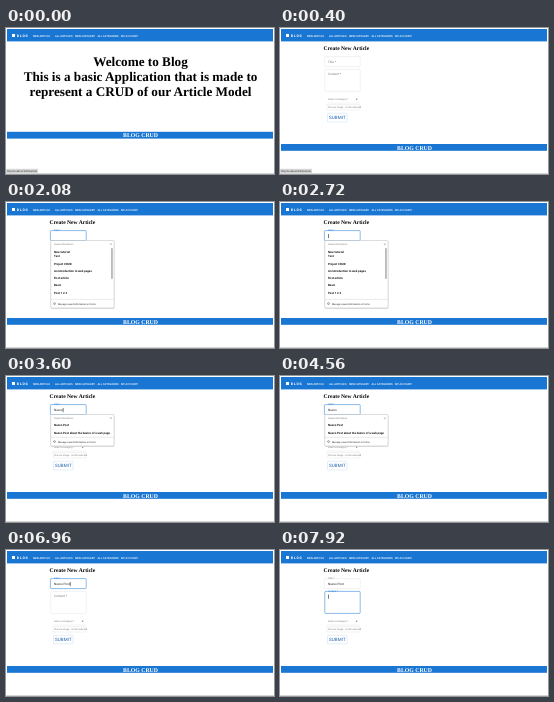
These frames come from a looping animation (268 by 146 pixels, 8 s). An HTML page:

```html
<!DOCTYPE html>
<html lang="en">
<head>
<meta charset="utf-8">
<title>Blog</title>
<style>
html, body { margin: 0; width: 100%; height: 100%; overflow: hidden; background: #fff; }
svg { display: block; width: 268px; height: 146px; }
text { font: 3.1px Roboto, "Liberation Sans", sans-serif; fill: #222; text-rendering: geometricPrecision; white-space: pre; }
.serif { font-family: "Liberation Serif", serif; font-weight: 700; fill: #000; }
.hero { font-size: 13.2px; text-anchor: middle; }
.head { font-size: 5.6px; }
.foot { font-size: 5.8px; text-anchor: middle; fill: #fff; }
.logo { font: 700 3.7px "Liberation Mono", monospace; letter-spacing: .7px; fill: #fff; }
.nav { font-size: 2.7px; font-weight: 500; fill: #fff; }
.label { fill: #777; }
.on { fill: #1976d2; }
.small { font-size: 2.4px; }
.item { font-size: 2.9px; font-weight: 700; fill: #111; }
.button { font-size: 4.5px; letter-spacing: .15px; fill: #1b5fae; }
.frame { fill: none; stroke: #c8c8c8; stroke-width: .25; }
.focus { stroke: #1976d2; stroke-width: .5; }
.blue { fill: #1976d2; }
</style>
</head>
<body>
<svg viewBox="0 0 268 146">
  <rect class="blue" x="1" y="1" width="266" height="12.4"/>
  <rect x="6" y="6" width="3" height="3" fill="#fff"/>
  <text class="logo" x="10.8" y="9">BLOG</text>
  <g id="nav"></g>

  <g id="home">
    <text class="serif hero" x="134.5" y="38">Welcome to Blog</text>
    <text class="serif hero" x="134.5" y="53">This is a basic Application that is made to</text>
    <text class="serif hero" x="134.5" y="68">represent a CRUD of our Article Model</text>
  </g>

  <g id="form">
    <text class="serif head" x="43.6" y="22.3">Create New Article</text>
    <rect id="titleBox" class="frame" x="44.4" y="28.6" width="35.8" height="10" rx=".8"/>
    <rect id="bodyBox" class="frame" x="44.8" y="41.4" width="35.4" height="22" rx=".8"/>
    <text id="titleLabel" class="label" x="48" y="35">Title *</text>
    <text id="bodyLabel" class="label" x="48" y="47">Content *</text>
    <text id="typed" x="48" y="35"></text>
    <rect id="caret" y="32" width=".6" height="4.2" fill="#222"/>
    <path class="frame" d="M47 75H80M47 76.6H80V82H47Z"/>
    <text class="label small" x="48" y="72.3">Select a Category *</text>
    <path d="M75.6 70.8h2.2l-1.1 1.2z" fill="#666"/>
    <text class="label small" x="48" y="80.2">Choose image - no file selected</text>
    <rect class="frame" x="47.5" y="85.3" width="19.6" height="8.6" rx=".8" stroke="#8cbae8" style="stroke:#8cbae8"/>
    <text class="button" x="48.9" y="91.3">SUBMIT</text>
  </g>

  <g id="list"></g>

  <g id="footer">
    <rect class="blue" x="1" width="266" height="6.8"/>
    <text class="serif foot" x="134.5" y="5.5">BLOG CRUD</text>
  </g>
  <rect y="145" width="268" height="1" fill="#d4d4d4"/>
  <g id="status">
    <rect y="140.8" width="32" height="5.2" fill="#d6d6d6"/>
    <text class="small" x="1" y="144.2">http://localhost:3000/article</text>
  </g>
</svg>
<script>
const $ = id => document.getElementById(id);
const show = (id, on) => $(id).style.display = on ? "" : "none";
const text = (x, y, cls, s) => `<text class="${cls}" x="${x}" y="${y}">${s}</text>`;

$("nav").innerHTML = [[27, "NEW ARTICLE"], [49, "ALL ARTICLES"], [69, "NEW CATEGORY"], [91.5, "ALL CATEGORIES"], [115, "MY ACCOUNT"]]
  .map(([x, s]) => text(x, 8.8, "nav", s)).join("");

// Autofill popup: rows above a divider, then a settings row
const popup = (bottom, rows, bar) => `
  <rect x="44.9" y="39.3" width="63.4" height="${bottom - 38.6}" rx="1" fill="#ddd"/>
  <rect x="44.7" y="38.5" width="63.4" height="${bottom - 38.5}" rx="1" fill="#fff" stroke="#aaa" stroke-width=".4"/>
  ${text(48, 43.2, "small label", "Saved information")}
  <path d="M104 41.4l1.6 1.6m0-1.6l-1.6 1.6" stroke="#666" stroke-width=".35"/>
  ${rows.map(([y, s]) => text(48, y, "item", s)).join("")}
  ${bar ? '<rect x="105.2" y="46" width="1.5" height="31" rx=".7" fill="#aaa"/>' : ""}
  <path d="M45 ${bottom - 8.6}H108" stroke="#ccc" stroke-width=".4"/>
  <circle cx="48.5" cy="${bottom - 4.4}" r=".9" fill="none" stroke="#444" stroke-width=".5"/>
  ${text(52, bottom - 3.4, "small", "Manage saved information in forms")}`;

const longList = popup(106, [[50.8, "New tutorial"], [55, "Test"], [63, "Project CRUD"], [70, "An introduction to web pages"],
  [77, "First article"], [84.3, "Basic"], [92, "Post 1 2 3"]], true);
const shortList = popup(70, [[50.3, "Nuevo Post"], [58, "Nuevo Post about the basics of a web page"]]);

const typing = [[2780, "N"], [2940, "Nu"], [3100, "Nue"], [3260, "Nuev"], [3420, "Nuevo"],
  [4720, "Nuev"], [5040, "Nuevo"], [5760, "Nuevo "], [5920, "Nuevo P"], [6080, "Nuevo Po"], [6320, "Nuevo Pos"], [6560, "Nuevo Post"]];

let lastList = "";
function draw(t) {
  const home = t < 240, titleOn = t >= 1280 && t < 7440, bodyOn = t >= 7440;
  show("home", home);
  show("form", !home);
  show("status", t < 1200);
  $("footer").setAttribute("transform", `translate(0 ${home ? 103.8 : 116})`);

  $("titleBox").classList.toggle("focus", titleOn);
  $("bodyBox").classList.toggle("focus", bodyOn);
  for (const [id, on, up, y] of [["titleLabel", titleOn, t >= 1280, 35], ["bodyLabel", bodyOn, bodyOn, 47]]) {
    const el = $(id);
    el.setAttribute("class", (on ? "on" : "label") + (up ? " small" : ""));
    el.setAttribute("y", up ? y - (y === 35 ? 5.6 : 4.9) : y);
  }

  const typed = $("typed");
  typed.textContent = typing.reduce((s, [at, v]) => t >= at ? v : s, "");
  const width = typed.textContent ? typed.getComputedTextLength() : 0;
  $("caret").setAttribute("x", bodyOn ? 48 : 48 + width);
  $("caret").setAttribute("y", bodyOn ? 44.6 : 32);
  show("caret", (titleOn || bodyOn) && (t + 420) % 1000 < 500);

  const list = t < 1600 || t >= 5800 ? "" : t < 2780 ? longList : shortList;
  if (list !== lastList) $("list").innerHTML = lastList = list;
}

function tick() {
  draw(performance.now() % 8000);
  requestAnimationFrame(tick);
}
tick();
</script>
</body>
</html>
```
